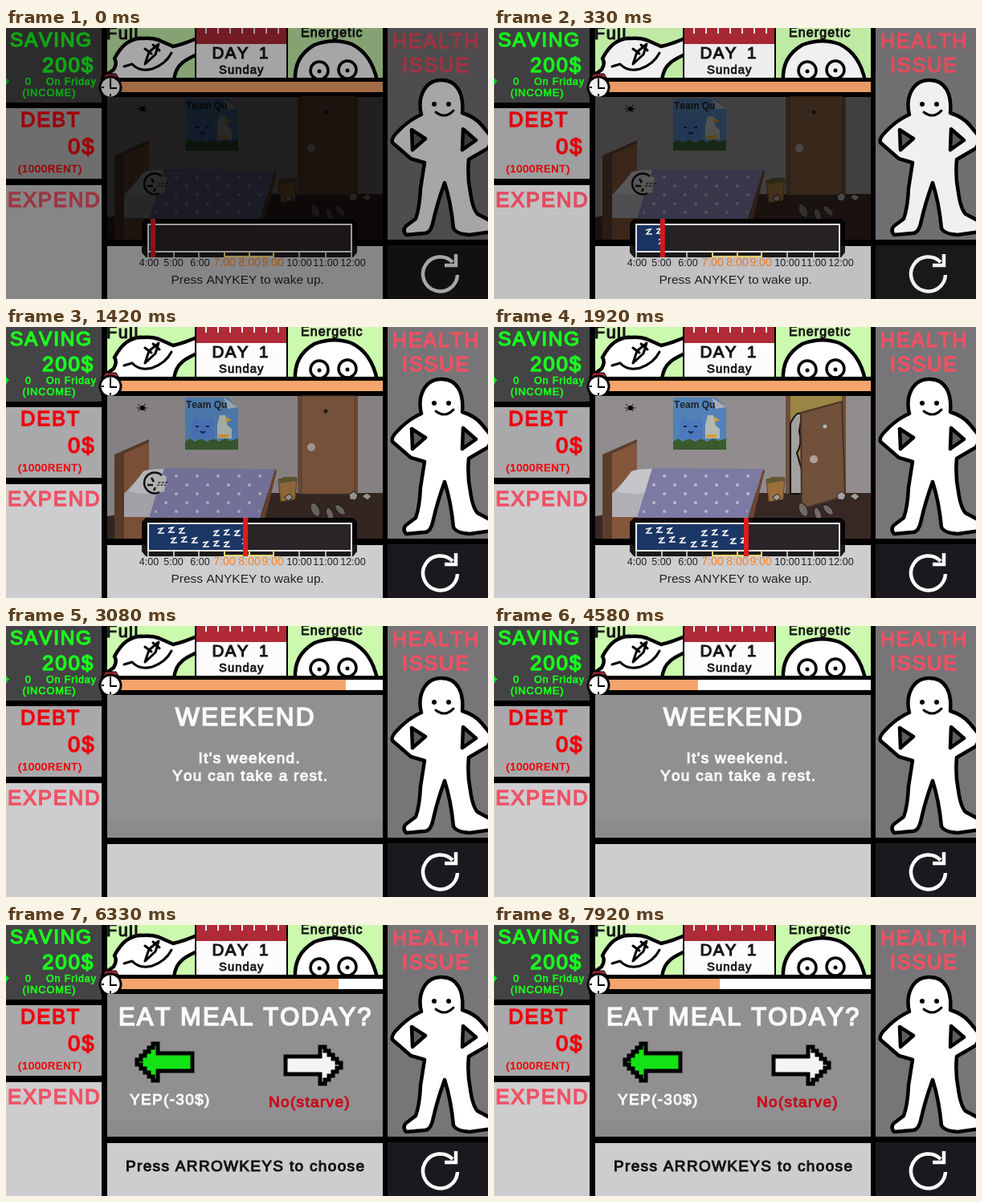
An HTML page for the animation above (8 s loop, 600 by 338 pixels).

```html
<!DOCTYPE html>
<html lang="en">
<head>
<meta charset="utf-8">
<title>Day 1</title>
<style>
  html, body { margin: 0; width: 100%; height: 100%; overflow: hidden; background: #000; }
  svg { display: block; width: 100%; height: 100%; }
  text { font-family: "Liberation Sans", Arial, sans-serif; font-kerning: none; white-space: pre; }
  .bold { letter-spacing: .07em; stroke: currentColor; stroke-width: .055em; }
  .ink { stroke: #000; stroke-width: 4.5; stroke-linejoin: round; stroke-linecap: round; fill: #fff; }
  .line { fill: none; stroke-width: 3; }
</style>
</head>
<body>
<svg viewBox="0 0 600 338" preserveAspectRatio="none">
  <defs>
    <pattern id="dots" x="206" y="181" width="26" height="22" patternUnits="userSpaceOnUse">
      <circle cx="6" cy="5" r="2" fill="#bfbfd2"/><circle cx="19" cy="16" r="2" fill="#bfbfd2"/>
    </pattern>
    <clipPath id="center"><rect x="126" width="343" height="264"/></clipPath>
    <clipPath id="slept"><rect id="sleptBox" x="178" y="246" height="32"/></clipPath>
    <path id="arrow" d="M163 168h5v-5h5v-5h5v-5h5v-5h6v12h43v22h-43v12h-6v-5h-5v-5h-5v-5h-5v-5h-5z"
      stroke="#000" stroke-width="5"/>
  </defs>
  <rect width="600" height="338"/>

  <!-- side panels -->
  <path fill="#444345" d="M0 0h119v93H0z"/>
  <path fill="#a9a8aa" d="M0 100h119v88H0z"/>
  <path fill="#cdcccf" d="M0 196h119v142H0zM126 272h343v66H126z"/>
  <path fill="#777578" d="M475 0h125v264H475z"/>
  <path fill="#1b191d" d="M475 271h125v67H475z"/>

  <!-- health figure -->
  <g class="ink">
    <path d="M517 108C512 88 520 65 542 65C563 65 570 84 568 106Q584 111 592 121L606 138L600 150L576 164
      Q574 185 578 205Q581 226 587 232L606 242V254L577 258Q561 257 557 250Q554 218 546 193Q537 218 532 240
      Q529 256 521 256L498 258Q493 252 498 247L510 238Q515 224 516 200L521 168L504 163L481 143Q479 138 487 130Q501 115 517 108Z"/>
    <path fill="#5e5c5f" d="M505 127L522 138L506 152ZM569 126L585 140L568 152Z"/>
    <path class="line" d="M535 105Q547 114 557 103"/>
  </g>
  <circle cx="533" cy="95" r="3"/><circle cx="551" cy="95" r="3"/>
  <path fill="none" stroke="#fff" stroke-width="4.5" d="M562 308A21.500 21.500 0 1 1 556 292M560 282V296H546"/>

  <!-- status strip -->
  <path fill="#cbf9ae" d="M126 0h343v62H126z"/>
  <g class="ink" clip-path="url(#center)">
    <path d="M120 62L134 52Q139 44 135 38Q142 25 150 19Q160 12 170 13Q181 12 190 15L208 23Q222 20 242 11V31Q222 40 219 44Q211 50 209 65H120Z"/>
    <path class="line" d="M147 48L157 45Q166 55 182 51Q199 45 206 31M173 45L178 30L190 20L186 33ZM173 26L181 32M183 21L191 28"/>
    <path d="M360 66Q358 36 384 21Q408 12 430 20Q455 32 462 66Z"/>
    <g stroke-width="3.500"><circle cx="390" cy="53" r="11"/><circle cx="425" cy="52" r="11"/></g>
  </g>
  <circle cx="390" cy="54" r="2.500"/><circle cx="425" cy="53" r="2.500"/>
  <path fill="#fcfcfc" stroke="#000" stroke-width="2" d="M236 -2H350V64H236z"/>
  <path fill="#b02a38" d="M237 0H349V20H237z"/>
  <path stroke="#eee" stroke-width="2" d="M249 0v7m15 -7v7m15 -7v7m15 -7v7m15 -7v7m15 -7v7m15 -7v7"/>
  <path d="M118 62H475V86H118z"/>
  <path fill="#fff" d="M135 67H469V80H135z"/>
  <rect id="timer" x="135" y="67" height="13" fill="#f5a46b"/>
  <path fill="#a82835" stroke="#000" d="M121 62l3-5h13l3 5z"/>
  <circle cx="130" cy="74" r="13" fill="#fff" stroke="#000" stroke-width="3"/>
  <path fill="none" stroke="#000" stroke-width="2" d="M130 65V75H138M130 63v3m0 16v3m-11 -11h3"/>

  <!-- bedroom -->
  <g id="bedroom">
    <g clip-path="url(#center)">
      <path fill="#979293" d="M126 86H469V264H126z"/>
      <path fill="#3a2a24" d="M320 207H469V264H126V236z"/>
      <path fill="#5587bd" d="M223 88H276L289 100V153H223z"/>
      <path fill="#aeb5bd" d="M271 88l18 12-13 2z"/>
      <path fill="#3c5f32" d="M223 153v-10l6-4 6 4 8-4 7 4 8-4 7 4 8-4 7 3 9-3v14z"/>
      <path fill="#507dc8" d="M231 140V117l5-6 6 6h8l5-6 4 7v22z"/>
      <path fill="#b9bfba" d="M263 139v-17l3-12h7l3 13 5 4v12z"/>
      <path fill="#d9a33c" d="M274 112l7 4-7 3zM264 134h13v4h-13z"/>
      <path fill="none" stroke="#182945" stroke-width="2" d="M236 124h4m9 0h4m-11 6l3 2 3-2"/>
      <text x="224" y="101" font-size="12" font-weight="bold" fill="#222">Team Qu</text>
      <path stroke="#111" d="M164 96l10 9m0-9l-10 9m-1-4h13"/><circle cx="170" cy="101" r="3"/>

      <path fill="#75513b" d="M363 86H438V208H363z"/>
      <g id="closedDoor">
        <path fill="#845c42" stroke="#604231" d="M368 86H434V208H368z"/>
        <circle cx="380" cy="150" r="5" fill="#b6a99e"/><circle cx="398" cy="105" r="2.500" fill="#222"/>
      </g>
      <g id="openDoor">
        <path fill="#9f8b48" d="M369 86H433V208H369z"/>
        <path fill="#aaa7a5" stroke="#111" stroke-width="2" d="M369 208V120Q379 101 383 111L380 130Q384 146 377 157L383 178V208z"/>
        <path fill="#76543e" stroke="#49342a" stroke-width="2" d="M382 107L433 93L437 211L383 227z"/>
        <circle cx="398" cy="165" r="5" fill="#b6a99e"/><circle cx="412" cy="124" r="2.500" fill="#bbb"/>
      </g>

      <path fill="#a0733f" stroke="#5a4228" d="M339 190l23-2-2 27-18 3z"/>
      <path fill="#665d37" d="M340 190l6-3 15 0 1 5-21 3z"/>
      <g fill="#77706b" stroke="#24201e">
        <ellipse cx="385" cy="228" rx="5" ry="9" transform="rotate(-25 385 228)"/>
        <ellipse cx="403" cy="233" rx="4" ry="8" transform="rotate(-20 403 233)"/>
        <ellipse cx="416" cy="228" rx="4" ry="8" transform="rotate(-45 416 228)"/>
        <path fill="#aaa49f" d="M427 209l6-4 5 5-3 6-7-1zM443 211l6-4 6 4-5 5zM347 212l6-4 4 5-6 4z"/>
        <path fill="#536b55" d="M334 247l5-2 4 10-7 4zM343 248l12-3 1 5-11 3z"/>
      </g>

      <path fill="#604030" d="M135 159L178 140V184L147 207V264H135z"/>
      <path fill="#895a3e" d="M147 158L178 144V180L147 207zM147 235H316V243L170 252V264H147z"/>
      <path fill="#b8b6bd" d="M147 208L174 179L200 176L180 237H147z"/>
      <path fill="#cdccd1" d="M152 205L171 180Q182 176 198 178L188 207Q170 210 152 205z"/>
      <path fill="#817faa" d="M197 176L335 177L316 239L178 238z"/>
      <path fill="url(#dots)" d="M201 180L330 181L314 235L184 234z"/>
      <path fill="#704833" d="M335 177l2 3-16 64h-6z"/>
      <g id="sleeper">
        <path fill="#cac8c8" d="M195 184a13 13 0 1 0-2 22l4-1 3-18z"/>
        <path fill="none" stroke="#111" stroke-width="2.500" d="M194 185A13 13 0 1 0 191 206M181 188l3 5m-8 4h7m3 3l-2 4"/>
        <text x="188" y="198" font-size="9" font-style="italic" fill="#222">zzz</text>
      </g>
      <rect id="night" x="126" y="86" width="343" height="178"/>
    </g>

    <path opacity=".88" d="M174 238H432l5 5v37l-5 6H174l-5-6v-37z"/>
    <path fill="#292425" d="M177 245H430V279H177z"/>
    <g clip-path="url(#slept)">
      <path fill="#1b3766" d="M178 246H430V278H178z"/>
      <g id="snores" fill="none" stroke="#fff" stroke-width="1.600"></g>
    </g>
    <path fill="none" stroke="#eee" stroke-width="2" d="M177 245H430V279H177z"/>
    <path fill="none" stroke="#eee" stroke-width="1.500" d="M177 279v7m32-7v7m31-7v7m125-7v7m33-7v7m32-7v7"/>
    <path fill="none" stroke="#f2d571" stroke-width="2" d="M272 285H333M272 279v7m31-7v7m30-7v7"/>
    <rect id="needle" y="238" width="6" height="48" fill="#df1c1c"/>
    <g id="hours" text-anchor="middle"></g>
    <text x="205.500" y="319" font-size="15.500" fill="#222">Press ANYKEY to wake up.</text>
  </g>

  <g id="weekend">
    <path fill="#918f91" d="M126 86H469V264H126z"/>
    <path fill="#8c8a8c" d="M126 243H469V264H126z"/>
  </g>
  <g id="meal">
    <path fill="#918f91" d="M126 86H469V264H126z"/>
    <path fill="#8c8a8c" d="M126 243H469V264H126z"/>
    <use href="#arrow" fill="#15e315"/>
    <use href="#arrow" fill="#f5f4f5" transform="matrix(-1 0 0 1 580 4)"/>
  </g>
  <g id="hud"></g>
  <rect id="fade" width="600" height="338"/>
</svg>

<script>
const el = id => document.getElementById(id);
const add = (parent, markup) => el(parent).insertAdjacentHTML("beforeend", markup);
const label = (parent, x, y, size, color, text) => add(parent,
  `<text class="bold" x="${x}" y="${y}" font-size="${size}" fill="${color}" color="${color}">${text}</text>`);

const GREEN = "#1aff1e", RED = "#ee060e", PINK = "#ee5264", INK = "#151515", WHITE = "#fafafa";
label("hud", 5, 23, 24.5, GREEN, "SAVING");
label("hud", 45, 55, 26, GREEN, "200$");
label("hud", -3, 71, 12.5, GREEN, "+");
label("hud", 24, 71, 12.5, GREEN, "0");
label("hud", 50, 71, 12.5, GREEN, "On Friday");
label("hud", 20.5, 85, 12.8, GREEN, "(INCOME)");
label("hud", 18, 123, 25.5, RED, "DEBT");
label("hud", 77, 157, 27.5, RED, "0$");
label("hud", 15, 180, 12.7, RED, "(1000RENT)");
label("hud", 2, 223, 25.7, PINK, "EXPEND");
label("hud", 481, 25, 25, PINK, "HEALTH");
label("hud", 493, 55, 25.3, PINK, "ISSUE");
label("hud", 125, 14, 21.5, INK, "Full");
label("hud", 367, 11, 16, INK, "Energetic");
label("hud", 256.5, 38, 20.5, INK, "DAY");
label("hud", 315, 38, 20.5, INK, "1");
label("hud", 265, 57, 14.8, INK, "Sunday");
label("weekend", 211, 124, 31.5, WHITE, "WEEKEND");
label("weekend", 239.5, 171, 19, WHITE, "It's weekend.");
label("weekend", 207, 193, 18.9, WHITE, "You can take a rest.");
label("meal", 140, 125, 30.8, WHITE, "EAT MEAL TODAY?");
label("meal", 154, 224, 19, WHITE, "YEP(-30$)");
label("meal", 327, 227, 19, "#c80d1b", "No(starve)");
label("meal", 149, 307, 19, INK, "Press ARROWKEYS to choose");

[178, 208.5, 241.5, 272, 303, 332, 365, 398, 432].forEach((x, i) => {
  const rush = i > 2 && i < 6;
  add("hours", `<text x="${x}" y="297" font-size="${rush ? 14.2 : 12.5}" fill="${rush ? "#ef842f" : "#222"}">${i + 4}:00</text>`);
});
for (const [x, y] of [[189, 252], [205, 264], [245, 269], [258, 255], [294, 265]])
  for (let i = 0; i < 3; i++)
    add("snores", `<path d="M${x + i * 13} ${y - i % 2}l6-1-5 6 7 0"/>`);

const LOOP = 8000, WEEKEND_AT = 2640, MEAL_AT = 5620, WAKE_AT = 1617;
const clamp = (v, lo = 0, hi = 1) => Math.min(hi, Math.max(lo, v));
const show = (id, on) => el(id).setAttribute("display", on ? "inline" : "none");

function render(t) {
  const awake = t >= WAKE_AT;
  const needle = 183 + 0.081 * Math.min(t, WAKE_AT);
  const hoursSlept = (needle - 177) / 253;
  el("needle").setAttribute("x", needle - 3);
  el("sleptBox").setAttribute("width", needle - 178);
  el("night").setAttribute("opacity", clamp(0.7 - 1.22 * hoursSlept));
  show("sleeper", !awake);
  show("closedDoor", !awake);
  show("openDoor", awake);

  show("bedroom", t < WEEKEND_AT);
  show("weekend", t >= WEEKEND_AT && t < MEAL_AT);
  show("meal", t >= MEAL_AT);

  const spent = t < MEAL_AT ? 0.1127 * (t - 2672) : 0.0836 * (t - 5673);
  el("timer").setAttribute("width", clamp(334 - Math.max(0, spent), 9, 334));
  el("fade").setAttribute("opacity", 0.35 * clamp(1 - t / 400));
}

const start = performance.now();
function tick() {
  render((performance.now() - start) % LOOP);
  requestAnimationFrame(tick);
}
render(0);
requestAnimationFrame(tick);
</script>
</body>
</html>
```
